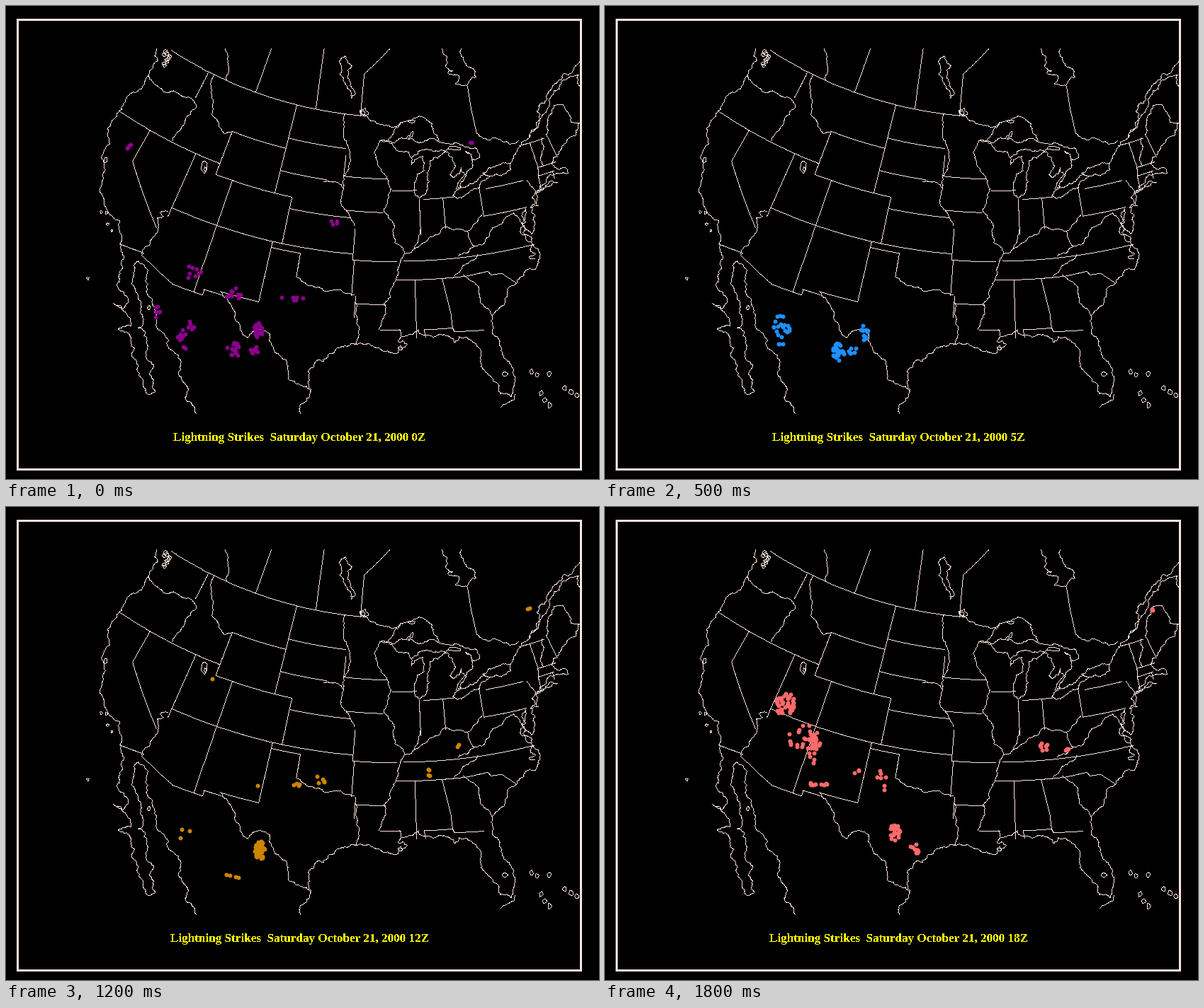
Recreate the animation shown at these times as a matplotlib script. Size 837x669 px, loop 3.8 s.

```python
import math
import random

import matplotlib.pyplot as plt
import numpy as np
from matplotlib.animation import FuncAnimation

W, H, DPI = 837, 669, 64
PX = 72 / DPI  # one pixel in points
INK = (255, 228, 220)
LAST_HOUR = 18

canvas = np.zeros((H, W, 3), np.uint8)
canvas[18:657, 15:813] = INK
canvas[21:654, 18:810] = 0
rng = random.Random(21)


def project(west, north):
    """Polar stereographic map centred on 90 W; returns stage pixels."""
    r = 1570 * math.tan(math.radians(90 - north) / 2)
    a = math.radians(90 - west)
    return 552.5 + r * math.sin(a), -430 + r * math.cos(a)


def polyline(pts):
    """One pixel wide line, clipped to the map area."""
    for (x0, y0), (x1, y1) in zip(pts, pts[1:]):
        n = math.ceil(max(abs(x1 - x0), abs(y1 - y0))) + 1
        xs = np.rint(np.linspace(x0, x1, n)).astype(int)
        ys = np.rint(np.linspace(y0, y1, n)).astype(int)
        keep = (ys >= 60) & (ys < 577) & (xs < 810)
        canvas[ys[keep], xs[keep]] = INK


def pairs(values):
    return list(zip(values[::2], values[1::2]))


def border(*lonlat):
    """Surveyed border through degrees west and north."""
    pts = pairs(lonlat)
    for (w0, n0), (w1, n1) in zip(pts, pts[1:]):
        polyline([project(w0 + (w1 - w0) * t, n0 + (n1 - n0) * t)
                  for t in np.linspace(0, 1, 12)])


def split(a, b, rough):
    """Midpoint displacement; returns the points after a, up to b."""
    if math.dist(a, b) < 3:
        return [b]
    k = rng.uniform(-rough, rough)
    mid = ((a[0] + b[0]) / 2 - k * (b[1] - a[1]),
           (a[1] + b[1]) / 2 + k * (b[0] - a[0]))
    return split(a, mid, rough) + split(mid, b, rough)


def coast(*xy, rough=0.25):
    """Natural line through a few stage points."""
    pts = pairs(xy)
    path = pts[:1]
    for a, b in zip(pts, pts[1:]):
        path += split(a, b, rough)
    polyline(path)


def river(*xy):
    coast(*xy, rough=0.18)


def ring(x, y, rx, ry, n=9):
    """Small irregular island or lake."""
    pts = []
    for i in range(n):
        a, r = math.tau * i / n, rng.uniform(0.6, 1.1)
        pts.append((x + rx * r * math.cos(a), y + ry * r * math.sin(a)))
    polyline(pts + pts[:1])


# Borders along parallels and meridians
for north, west, east in ((49, 123, 95.15), (45.94, 104.05, 96.6), (45, 111.05, 104.05),
                          (45, 74.7, 71.5), (43.5, 96.5, 91.2), (43, 104.05, 98.5),
                          (42.73, 73.3, 71.1), (42.5, 90.6, 87.8), (42.03, 73.5, 71.6),
                          (42, 124.2, 111.05), (42, 79.76, 75.35), (41.7, 87, 83.4),
                          (41, 111.05, 102.05), (40.6, 95.8, 91.7), (40, 102.05, 95.3),
                          (39.72, 80.52, 75.7), (37, 114.05, 94.62), (36.5, 103, 100),
                          (36.5, 94.62, 90.1), (36.55, 89.4, 75.9), (35, 90.2, 83.1),
                          (33, 94.05, 91.2), (32, 106.6, 103.06), (31.78, 108.2, 106.6),
                          (31.33, 111.07, 108.2), (31, 91.6, 89.7), (31, 87.6, 85)):
    border(west, north, east, north)

for west, south, north in ((120, 39, 42), (117.04, 46.4, 49), (114.05, 36.2, 42),
                           (111.05, 41, 45), (110, 49, 53.5), (109.05, 31.33, 41),
                           (108.2, 31.33, 31.78), (104.05, 41, 49), (103.04, 32, 37),
                           (102.05, 37, 41), (100, 34.56, 36.5), (96.5, 43.5, 45.3),
                           (94.62, 36.5, 39.1), (94.45, 33.6, 36.5), (94.05, 31.9, 33.6),
                           (88.3, 30.4, 35), (87.53, 38.7, 41.7), (84.81, 39.1, 41.7),
                           (80.52, 39.72, 42.2)):
    border(west, south, west, north)

border(120, 39, 114.63, 35)
border(117.1, 32.53, 114.72, 32.72, 114.8, 32.5, 111.07, 31.33)
border(101.36, 49, 102, 54.8)
border(95.15, 49, 95.15, 52.84, 91.2, 55.4)
border(87.6, 31, 87.5, 30.4)
border(85.6, 35, 85.05, 32.2, 85, 31, 84.86, 30.7, 82.2, 30.56)
border(83.1, 35, 81, 35.15, 80.8, 34.82, 79.7, 34.8, 78.55, 33.86)
border(73.35, 45, 73.25, 42.75, 73.5, 42.05, 73.6, 41)
border(71.08, 45.3, 70.7, 43.1)
border(71.8, 42.03, 71.8, 41.4)

# Canada
river(309, 60, 312, 75, 314, 90, 312, 105)
river(664, 180, 673, 187, 690, 186, 710, 195, 723, 190)
polyline([(651, 113), (656, 145), (664, 180)])
coast(478, 70, 470, 78, 475, 100, 487, 130, 492, 125, 482, 98, 488, 84, 478, 70)
coast(615, 60, 622, 72, 620, 85, 630, 91, 623, 94, 637, 97, 634, 110, 650, 112,
      663, 100, 647, 80, 642, 60)
ring(505, 150, 6, 6, 14)
ring(503, 151, 4, 4)

# Pacific coast
coast(212, 60, 209, 70, 213, 78, 204, 90, 201, 96)
for i in range(9):
    ring(219 + rng.uniform(0, 12), 64 + i * 2.4, 3, 3)
river(201, 96, 207, 108, 228, 122, 250, 128, 265, 134)
river(201, 96, 184, 121, 163, 146, 143, 172, 134, 214, 138, 222, 136, 240, 132, 262,
      138, 281, 160, 303, 163, 325, 161, 336)
ring(140, 217, 3, 5)
for x, y in ((134, 291), (141, 292), (143, 308), (149, 317), (115, 385)):
    ring(x, y, 2, 2)

# Baja California and Sonora
coast(161, 336, 160, 375, 172, 416, 165, 428, 151, 420, 168, 432, 176, 452, 158, 456,
      176, 470, 180, 498, 193, 528, 197, 547, 210, 545, 208, 528, 197, 490, 186, 455,
      190, 430, 187, 415, 180, 380, 186, 360)
coast(186, 360, 200, 373, 204, 412, 212, 445, 222, 462, 231, 485, 243, 517, 254, 537,
      268, 576)
ring(201, 426, 2, 4)

# Western rivers and ranges
river(228, 290, 217, 292, 222, 297, 213, 299, 214, 318, 202, 338, 191, 350)
river(265, 134, 268, 143, 252, 163, 234, 190)
river(293, 97, 288, 110, 291, 140, 300, 168, 308, 180, 319, 177)
ring(279, 227, 5, 9, 12)
ring(281, 230, 2, 4)

# Plains, Texas and the Gulf
river(409, 382, 430, 395, 450, 403, 475, 404, 491, 408)
river(493, 419, 495, 440, 498, 455, 494, 478)
river(478, 152, 477, 170, 480, 190, 476, 240, 476, 258, 479, 288, 485, 298, 491, 310)
river(448, 248, 468, 249, 476, 258)
river(302, 403, 318, 423, 322, 440, 330, 458, 341, 469, 357, 457, 372, 463, 387, 495,
      398, 527, 430, 545)
coast(415, 576, 417, 562, 428, 552, 427, 514, 437, 502, 470, 483, 493, 478)
coast(493, 478, 510, 477, 530, 487, 550, 491, 566, 478, 553, 474, 563, 466, 600, 466,
      612, 464, 632, 475, 650, 468, 658, 475)
ring(556, 483, 4, 3)
river(658, 475, 670, 492, 669, 503, 684, 524, 697, 548, 713, 552, 718, 530, 706, 500,
      688, 465, 684, 445, 692, 430, 707, 410)
coast(698, 567, 716, 557, 718, 549)
ring(704, 520, 4, 4)
for x, y in ((741, 517), (749, 521), (766, 520), (755, 547), (760, 557), (767, 564),
             (788, 540), (797, 546), (805, 551)):
    ring(x, y, 3, 4)

# Mississippi and Ohio valleys
river(527, 190, 519, 207, 524, 220, 538, 244, 543, 258, 533, 291, 548, 313, 562, 350,
      552, 373, 533, 421, 535, 432, 526, 457)
river(555, 457, 557, 466)
river(585, 313, 582, 328, 576, 342)
river(562, 350, 572, 348, 590, 334, 618, 312, 638, 315, 650, 318, 665, 305, 671, 295)
river(650, 318, 658, 338, 675, 335, 690, 312, 705, 298, 716, 292)
river(660, 340, 638, 353)
river(665, 351, 643, 370, 633, 381)
river(645, 380, 668, 408, 685, 437)

# Great Lakes
river(501, 152, 515, 162, 543, 171, 556, 165)
coast(527, 190, 556, 164, 575, 158, 590, 158, 601, 166, 611, 190)
coast(527, 190, 552, 190, 574, 177, 567, 188, 590, 190, 611, 192)
ring(572, 163, 6, 2)
river(540, 193, 568, 206, 571, 214)
coast(583, 271, 577, 248, 588, 212, 572, 224, 571, 214, 590, 203, 624, 202)
coast(583, 271, 597, 248, 594, 235, 603, 214, 622, 206, 634, 225, 626, 238, 633, 241,
      642, 228, 648, 238, 630, 268)
coast(611, 192, 645, 197, 664, 201, 668, 211, 660, 217, 648, 205, 657, 216, 649, 238,
      637, 260)
ring(633, 201, 10, 3, 14)
coast(637, 260, 660, 250, 683, 240, 668, 257, 643, 271, 630, 268)
coast(683, 240, 672, 236, 680, 229, 711, 222, 712, 231, 683, 240)
river(711, 222, 723, 200, 738, 186)

# Northeast
coast(738, 186, 753, 160, 766, 120, 785, 97, 809, 78)
coast(738, 186, 759, 152, 770, 126, 787, 104, 808, 97, 809, 113)
river(756, 186, 755, 212, 757, 224)
river(763, 181, 764, 162, 773, 140, 786, 139, 797, 164, 809, 165)
coast(772, 214, 783, 202, 792, 188, 804, 180, 809, 165)
coast(772, 214, 774, 228, 788, 228, 793, 236, 779, 236, 762, 248, 747, 263)
coast(748, 264, 770, 251, 778, 249, 748, 264)
river(735, 246, 747, 263, 742, 271, 747, 278, 740, 285)
coast(747, 263, 751, 282, 741, 284, 746, 308, 741, 322, 733, 286, 728, 292, 742, 337)
coast(716, 292, 727, 306, 734, 315, 729, 320, 742, 335)
coast(742, 337, 753, 354, 742, 372, 724, 386, 707, 410)
coast(742, 337, 740, 347, 747, 350, 738, 354, 746, 357)

storms = []


def storm(first, last, start, end, spread, counts):
    """Cluster of strikes drifting from start to end between two hours."""
    storms.append((first, last, np.array(start), np.array(end), spread, counts))


# Mexico and the Rio Grande
storm(0, 9, (254, 464), (243, 452), (13, 21), (18, 26))
storm(10, 12, (246, 456), (253, 465), (9, 17), (14, 3))
storm(0, 4, (212, 430), (209, 448), (7, 14), (6, 20))
storm(0, 9, (356, 457), (373, 464), (6, 11), (20, 7))
storm(0, 9, (320, 486), (335, 489), (9, 13), (18, 36))
storm(0, 8, (351, 488), (346, 482), (7, 7), (9, 5))
storm(10, 12, (343, 486), (358, 484), (7, 13), (36, 40))
storm(13, 18, (366, 477), (409, 460), (8, 13), (36, 20))
storm(9, 12, (306, 518), (318, 522), (13, 4), (4, 4))
storm(14, 17, (368, 492), (374, 487), (6, 6), (3, 5))

# Texas, Oklahoma and Kansas
storm(0, 3, (322, 408), (333, 408), (13, 12), (10, 4))
storm(0, 4, (404, 412), (399, 409), (18, 4), (6, 6))
storm(0, 2, (461, 304), (466, 300), (8, 4), (4, 2))
storm(11, 13, (408, 392), (412, 394), (6, 4), (4, 5))
storm(10, 17, (443, 386), (454, 384), (12, 7), (2, 14))
storm(16, 18, (440, 490), (438, 482), (9, 7), (2, 10))
storm(17, 18, (386, 380), (390, 386), (9, 17), (4, 7))

# The West
storm(0, 1, (174, 197), (176, 195), (4, 6), (5, 3))
storm(0, 2, (261, 375), (266, 372), (14, 12), (8, 3))
storm(12, 16, (285, 241), (261, 258), (9, 3), (1, 7))
storm(14, 16, (276, 337), (278, 335), (7, 7), (3, 7))
storm(12, 18, (353, 389), (355, 372), (4, 9), (1, 3))
storm(17, 18, (254, 272), (254, 278), (14, 18), (18, 42))
storm(17, 18, (285, 322), (282, 325), (25, 18), (12, 30))
storm(17, 18, (294, 340), (293, 342), (7, 22), (8, 18))
storm(17, 18, (300, 390), (302, 391), (14, 4), (4, 9))

# The East
storm(0, 3, (656, 192), (662, 198), (4, 3), (2, 5))
storm(8, 15, (628, 329), (644, 342), (3, 3), (2, 2))
storm(8, 13, (587, 372), (602, 377), (6, 9), (6, 4))
storm(16, 18, (603, 347), (620, 337), (7, 7), (1, 8))
storm(16, 18, (644, 342), (652, 342), (4, 4), (1, 4))
storm(12, 16, (738, 142), (777, 125), (2, 1), (2, 3))
storm(17, 18, (775, 134), (772, 143), (2, 2), (2, 3))


def strikes_at(hour):
    points = []
    for k, (first, last, start, end, (rx, ry), (n0, n1)) in enumerate(storms):
        if not first <= hour <= last:
            continue
        t = (hour - first) / (last - first)
        x, y = start + (end - start) * t
        dice = random.Random(100 * k + hour)
        for _ in range(round(n0 + (n1 - n0) * t)):
            a, r = dice.uniform(0, math.tau), math.sqrt(dice.random())
            points.append((round(x + rx * r * math.cos(a)), round(y + ry * r * math.sin(a))))
    return points


COLORS = ["#8b008b", "#912cee", "#8968cd", "#00eeee", "#00b2ee", "#1e90ff", "#104e8b",
          "#008b00", "#00cd00", "#7fff00", "#eeee00", "#ffd700", "#cd8500", "#ff7f00",
          "#ee4000", "#cd0000", "#8b0000", "#ee2c2c", "#ff6a6a"]

fig = plt.figure(figsize=(W / DPI, H / DPI), dpi=DPI, facecolor="black")
ax = fig.add_axes([0, 0, 1, 1])
ax.axis("off")
ax.imshow(canvas, aspect="auto", interpolation="nearest")
ax.set(xlim=(-0.5, W - 0.5), ylim=(H - 0.5, -0.5))
dots, = ax.plot([], [], "o", ms=6 * PX, mew=0, antialiased=False)
title = ax.text(414, 614.5, "", color="yellow", ha="center", va="baseline",
                family="Liberation Serif", weight="bold", size=17.1 * PX,
                antialiased=False)


def draw(i):
    hour = min(i, LAST_HOUR)
    dots.set_data(*zip(*strikes_at(hour)))
    dots.set_color(COLORS[hour])
    title.set_text(f"Lightning Strikes  Saturday October 21, 2000 {hour}Z")
    return dots, title


anim = FuncAnimation(fig, draw, frames=38, interval=100, repeat=True)
plt.show()
```
